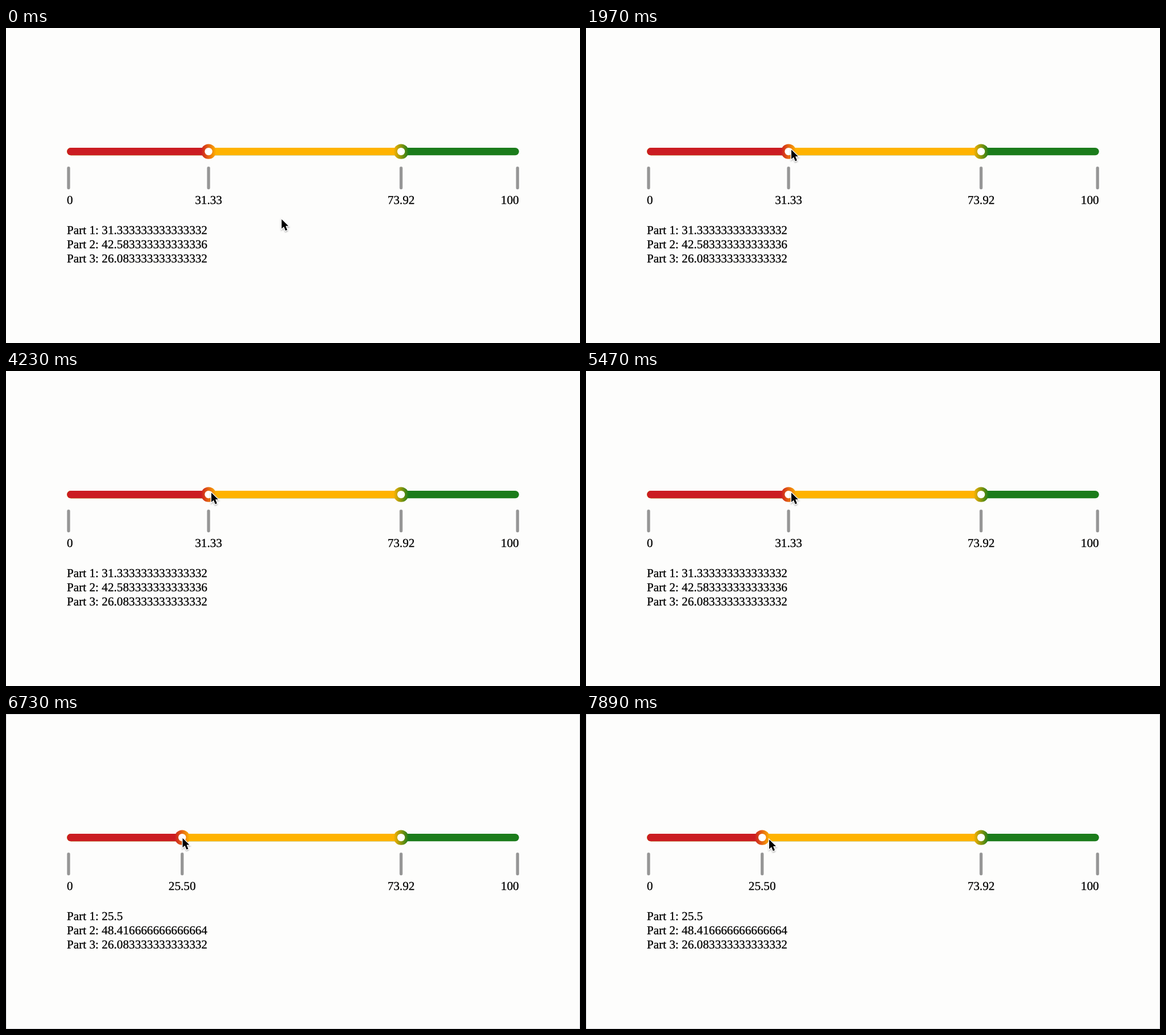
Animation of 1009x555 px, one loop 7990 ms. Source, as an HTML page:

```html
<!DOCTYPE html>
<html lang="en">
<head>
<meta charset="utf-8">
<title>Three-part slider</title>
<style>
  html, body { margin: 0; width: 100%; height: 100%; overflow: hidden; background: #fdfdfc; }
  svg { display: block; width: 100%; height: 100%; }
  text {
    font: 21.23px "Liberation Serif", "Times New Roman", serif;
    text-rendering: geometricPrecision;
    fill: #000; stroke: #000; stroke-width: .3;
  }
  .mid { text-anchor: middle; }
  .end { text-anchor: end; }
  .tick { fill: #969696; }
  .hole { fill: #fff; }
</style>
</head>
<body>
<svg viewBox="0 0 1009 555">
  <defs>
    <linearGradient id="warm"><stop stop-color="#cb1c22"/><stop offset="1" stop-color="#ffb300"/></linearGradient>
    <linearGradient id="cool"><stop stop-color="#ffb300"/><stop offset="1" stop-color="#1b7c1b"/></linearGradient>
    <clipPath id="pill"><rect x="107.2" y="211" width="794.6" height="13.2" rx="6.6"/></clipPath>
    <filter id="shadow" x="-50%" y="-50%" width="200%" height="200%">
      <feDropShadow dx="0" dy="1.5" stdDeviation="1.3" flood-opacity=".35"/>
    </filter>
    <g id="tick"><rect class="tick" x="-2.65" y="244.3" width="5.3" height="40" rx="2.3"/></g>
  </defs>

  <g clip-path="url(#pill)">
    <rect x="107" y="210" width="795" height="16" fill="#1b7c1b"/>
    <rect x="107" y="210" width="587.5" height="16" fill="#ffb300"/>
    <rect id="red" x="107" y="210" height="16" fill="#cb1c22"/>
  </g>

  <use href="#tick" x="110"/>
  <use href="#tick" x="899.2"/>
  <text x="107" y="310.3">0</text>
  <text x="901.6" y="310.3" class="end">100</text>

  <g id="low">
    <circle cy="217.6" r="13.2" fill="url(#warm)"/>
    <circle cy="217.6" r="6.7" class="hole"/>
    <use href="#tick"/>
    <text id="lowLabel" y="310.3" class="mid"></text>
  </g>
  <g transform="translate(694.5)">
    <circle cy="217.6" r="13.2" fill="url(#cool)"/>
    <circle cy="217.6" r="6.7" class="hole"/>
    <use href="#tick"/>
    <text y="310.3" class="mid">73.92</text>
  </g>

  <text id="part1" x="107" y="363.4"></text>
  <text id="part2" x="107" y="388"></text>
  <text id="part3" x="107" y="412.6"></text>

  <rect id="border" x=".5" y=".5" width="1008" height="554" fill="none" stroke="#d9d9db"/>
  <path id="cursor" filter="url(#shadow)" stroke="#fff" stroke-width="2.4" paint-order="stroke"
        d="M0 0V16.6L3.9 13L6.8 20L9.9 18.7L7 11.8H11.9Z"/>
</svg>
<script>
const LOOP = 7990;
const TRACK = 600;       // slider length in its own units
const HIGH = 443.5;      // fixed upper handle
const byId = id => document.getElementById(id);

// Keys are [time, value, ...]; values hold before the first and after the last key.
const cursorKeys = [
  [70, 484.5, 337], [330, 361, 214.5],
  [5650, 361, 214.5], [6210, 315.5, 218],
  [6310, 315.5, 218], [6650, 310.5, 218.7],
  [7300, 310.5, 218.7], [7650, 322, 221.3]
];
const handleKeys = [[5690, 188], [6210, 159], [6310, 159], [6680, 153]];

const smooth = k => k * k * (3 - 2 * k);

function sample(keys, t) {
  const next = keys.findIndex(key => key[0] > t);
  if (next === 0) return keys[0].slice(1);
  if (next < 0) return keys[keys.length - 1].slice(1);
  const a = keys[next - 1], b = keys[next];
  const k = smooth((t - a[0]) / (b[0] - a[0]));
  return a.slice(1).map((v, i) => v + (b[i + 1] - v) * k);
}

const percent = units => units * 100 / TRACK;

function draw(t) {
  const [x, y] = sample(cursorKeys, t);
  const low = Math.round(sample(handleKeys, t)[0]);
  const lowX = 107 + percent(low) * 7.949;

  byId('cursor').setAttribute('transform', `translate(${x} ${y})`);
  byId('low').setAttribute('transform', `translate(${lowX})`);
  byId('red').setAttribute('width', lowX - 107);
  byId('lowLabel').textContent = percent(low).toFixed(2);
  [low, HIGH - low, TRACK - HIGH].forEach((part, i) => {
    byId('part' + (i + 1)).textContent = `Part ${i + 1}: ${percent(part)}`;
  });
  byId('border').style.display = t >= 5610 ? '' : 'none';
}

const start = performance.now();
function frame() {
  draw((performance.now() - start) % LOOP);
  requestAnimationFrame(frame);
}
frame();
</script>
</body>
</html>
```
